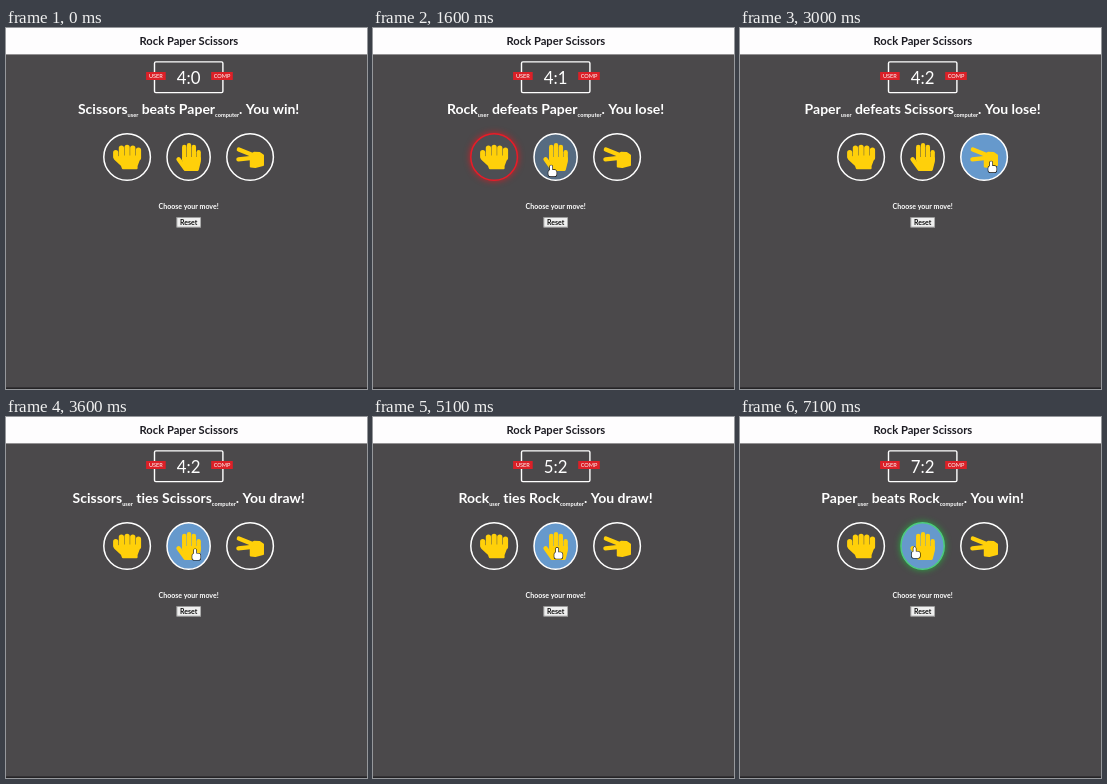
An HTML page with a canvas for the animation above (7200 ms loop, 361 by 361 pixels).

```html
<!DOCTYPE html>
<html lang="en">
<head>
<meta charset="utf-8">
<title>Rock Paper Scissors</title>
<style>
html, body { margin: 0; width: 100%; height: 100%; overflow: hidden; background: #4b494b; }
canvas { display: block; width: 361px; height: 361px; }
</style>
</head>
<body>
<canvas id="stage"></canvas>
<script>
const SIZE = 361, LOOP = 7200, STEP = 100;
const GLOW_TIME = 450, FADE = 200, LEAVE = 100, TRAVEL = 450;
const REM = 5.6, MID = 182.6, ROW_Y = 129, RY = 23.3, SPACING = 61.5;
const BACK = '#4b494b', YELLOW = '#ffd00a';
const canvas = document.getElementById('stage');
const ctx = canvas.getContext('2d');
const ratio = window.devicePixelRatio || 1;
canvas.width = canvas.height = Math.round(SIZE * ratio);

const finger = (x1, y1, x2, y2, width) => ({ x1, y1, x2, y2, width });

// Four upright fingers whose tips follow a parabola peaking at the second one.
function fingerRow(x, gap, top, curve, bottom, width) {
  return [0, 1, 2, 3].map(i =>
    finger(x + i * gap, top + curve * (i - 1) ** 2, x + i * gap, bottom, width));
}

// Hands are drawn in a 512-unit-high box.
const hands = {
  Rock: {
    x: MID - SPACING, rx: 23.3, width: 512,
    fingers: [finger(48, 176, 48, 250, 96), ...fingerRow(152, 104, 80, 12, 270, 96)],
    palm: [[124, 250], [490, 250], [428, 416], [428, 460], [180, 460], [160, 405], [36, 290]]
  },
  Paper: {
    x: MID, rx: 21.6, width: 448,
    fingers: [finger(40, 296, 165, 468, 80), ...fingerRow(144, 88, 40, 32, 300, 80)],
    palm: [[124, 276], [428, 276], [428, 340], [390, 490], [165, 490]]
  },
  Scissors: {
    x: MID + SPACING, rx: 23.3, width: 512,
    fingers: [finger(50, 118, 300, 220, 78), finger(42, 298, 300, 272, 78)],
    palm: [[270, 225], [330, 180], [430, 185], [490, 225], [490, 400], [350, 436], [270, 430]]
  }
};

const outcomes = {
  beats: { ending: 'You win!', border: '#4dcc7d', glow: '#20c43a' },
  defeats: { ending: 'You lose!', border: '#e81c28', glow: '#e81820' },
  ties: { ending: 'You draw!', border: '#555350', glow: '#a09a90' }
};

const rounds = [
  { at: 0, user: 'Scissors', verb: 'beats', comp: 'Paper' },
  { at: 1300, user: 'Rock', verb: 'defeats', comp: 'Paper' },
  { at: 2300, user: 'Paper', verb: 'defeats', comp: 'Scissors' },
  { at: 3100, user: 'Scissors', verb: 'ties', comp: 'Scissors' },
  { at: 3900, user: 'Paper', verb: 'beats', comp: 'Rock' },
  { at: 4600, user: 'Rock', verb: 'ties', comp: 'Rock' },
  { at: 5400, user: 'Paper', verb: 'beats', comp: 'Rock' },
  { at: 6100, user: 'Scissors', verb: 'ties', comp: 'Scissors' },
  { at: 6900, user: 'Paper', verb: 'beats', comp: 'Rock' }
];

const smooth = k => k * k * (3 - 2 * k);
const easeOut = k => 1 - (1 - k) ** 3;
const roundIndex = t => rounds.filter(r => r.at <= t).length - 1;

function scoreAt(index) {
  const count = verb => rounds.slice(0, index + 1).filter(r => r.verb === verb).length;
  return `${3 + count('beats')}:${count('defeats')}`;
}

// The pointer rests on each clicked hand, drifting a little from one stop to the next.
function stop(i) {
  if (i === 0) return { x: 342, y: 274 };
  return { x: hands[rounds[i].user].x + 7 - 0.6 * (i - 3) ** 2, y: 128 + 16 / i };
}

function pointerAt(t) {
  if (t < LEAVE) return null;
  const i = roundIndex(t);
  const from = stop(i), to = stop(Math.min(i + 1, rounds.length - 1));
  const k = easeOut(Math.min(1, Math.max(0, (t - rounds[i].at - LEAVE) / TRAVEL)));
  return { x: from.x + (to.x - from.x) * k, y: from.y + (to.y - from.y) * k };
}

function isOver(hand, p) {
  return p && ((p.x - hand.x) / hand.rx) ** 2 + ((p.y - ROW_Y) / RY) ** 2 < 1;
}

function hoverAmount(hand, t) {
  const samples = 20;
  let hits = 0;
  for (let i = 0; i < samples; i++) {
    if (isOver(hand, pointerAt(t - i * FADE / samples))) hits++;
  }
  return smooth(hits / samples);
}

function setFont(size, weight) {
  ctx.font = `${weight} ${size}px Lato, sans-serif`;
  ctx.letterSpacing = '0.001px'; // keeps ligatures off
}

function label(text, x, y, size, weight, color) {
  setFont(size, weight);
  ctx.textAlign = 'center';
  ctx.fillStyle = color;
  ctx.fillText(text, x, y);
}

function tracePolygon(points) {
  ctx.beginPath();
  points.forEach(([x, y]) => ctx.lineTo(x, y));
  ctx.closePath();
}

function drawMessage({ user, verb, comp }) {
  const runs = [[user, 0], ['user', 1], [` ${verb} ${comp}`, 0], ['computer', 1],
    [`. ${outcomes[verb].ending}`, 0]];
  const useRun = sub => setFont(sub ? REM : REM * 2.5, 700);
  const widths = runs.map(([text, sub]) => {
    useRun(sub);
    return ctx.measureText(text).width;
  });
  let x = MID - widths.reduce((a, b) => a + b) / 2;
  ctx.textAlign = 'left';
  ctx.fillStyle = '#fff';
  runs.forEach(([text, sub], i) => {
    useRun(sub);
    ctx.fillText(text, x, sub ? 88.8 : 85.6);
    x += widths[i];
  });
}

function drawBadge(text, x) {
  const width = 20.6 + (text === 'COMP' ? 1 : -1);
  ctx.fillStyle = '#dc2027';
  ctx.fillRect(x - width / 2, 44, width, 8);
  label(text, x, 50, REM, 400, '#fff');
}

function drawScore(score) {
  ctx.strokeStyle = '#fff';
  ctx.lineWidth = 1.4;
  ctx.beginPath();
  ctx.roundRect(148.5, 33.9, 68.4, 30.7, 1.4);
  ctx.stroke();
  label(score, MID, 55.7, REM * 3, 400, '#fff');
  drawBadge('USER', 149.9);
  drawBadge('COMP', 216);
}

function drawHand({ x, width, fingers, palm }, name) {
  const scale = REM * 5 / 512;
  ctx.save();
  ctx.translate(x - width * scale / 2, ROW_Y - 256 * scale);
  ctx.scale(scale, scale);
  ctx.fillStyle = ctx.strokeStyle = YELLOW;
  ctx.lineCap = ctx.lineJoin = 'round';
  for (const f of fingers) {
    ctx.lineWidth = f.width;
    ctx.beginPath();
    ctx.moveTo(f.x1, f.y1);
    ctx.lineTo(f.x2, f.y2);
    ctx.stroke();
  }
  tracePolygon(palm);
  ctx.lineWidth = 40;
  ctx.fill();
  ctx.stroke();
  ctx.restore();
}

function drawChoice(hand, hover, outcome) {
  ctx.save();
  ctx.beginPath();
  ctx.ellipse(hand.x, ROW_Y, hand.rx, RY, 0, 0, Math.PI * 2);
  ctx.lineWidth = 1.5;
  if (outcome) {
    ctx.shadowColor = ctx.fillStyle = outcome.glow;
    ctx.shadowBlur = 7 * ratio;
    ctx.fill();
    ctx.shadowBlur = 0;
  }
  ctx.fillStyle = BACK;
  ctx.fill();
  ctx.globalAlpha = hover;
  ctx.fillStyle = '#6699cc';
  ctx.fill();
  ctx.globalAlpha = 1;
  ctx.strokeStyle = outcome ? outcome.border : '#fff';
  ctx.stroke();
  ctx.restore();
  drawHand(hand);
}

function drawReset() {
  ctx.fillStyle = '#efefef';
  ctx.fillRect(170.6, 189.2, 24.4, 10.2);
  ctx.strokeStyle = '#888';
  ctx.lineWidth = 0.7;
  ctx.strokeRect(170.9, 189.5, 23.8, 9.6);
  label('Reset', MID, 196.9, REM * 1.25, 700, '#111');
}

function drawPointer(p) {
  ctx.save();
  ctx.translate(p.x, p.y);
  if (Object.values(hands).some(hand => isOver(hand, p))) {
    ctx.beginPath();
    ctx.roundRect(-1.2, 0, 2.4, 8, 1.2);
    ctx.roundRect(-2.8, 4.6, 8.2, 6.4, 2);
  } else {
    tracePolygon([[0, 0], [0, 7.5], [1.8, 5.8], [5, 5.3]]);
  }
  ctx.lineWidth = 1.2;
  ctx.strokeStyle = '#111';
  ctx.fillStyle = '#fff';
  ctx.stroke();
  ctx.fill();
  ctx.restore();
}

function draw(t) {
  const index = roundIndex(t), round = rounds[index];
  const glowing = index > 0 && t - round.at < GLOW_TIME;
  ctx.setTransform(ratio, 0, 0, ratio, 0, 0);
  ctx.fillStyle = BACK;
  ctx.fillRect(0, 0, SIZE, SIZE);
  ctx.fillStyle = '#fefdfe';
  ctx.fillRect(0, 0, SIZE, 26.4);
  ctx.fillStyle = '#252426';
  ctx.fillRect(0, 359.4, SIZE, 1.6);
  label('Rock Paper Scissors', MID + 0.3, 17.1, REM * 2, 700, '#1c1b22');
  drawScore(scoreAt(index));
  drawMessage(round);
  for (const [name, hand] of Object.entries(hands)) {
    const outcome = glowing && name === round.user ? outcomes[round.verb] : null;
    drawChoice(hand, hoverAmount(hand, t), outcome);
  }
  label('Choose your move!', MID, 180.7, REM * 1.25, 700, '#fff');
  drawReset();
  const pointer = pointerAt(t);
  if (pointer) drawPointer(pointer);
}

const start = performance.now();
function tick() {
  const t = (performance.now() - start) % LOOP;
  draw(Math.floor(t / STEP) * STEP);
  requestAnimationFrame(tick);
}
tick();
</script>
</body>
</html>
```
